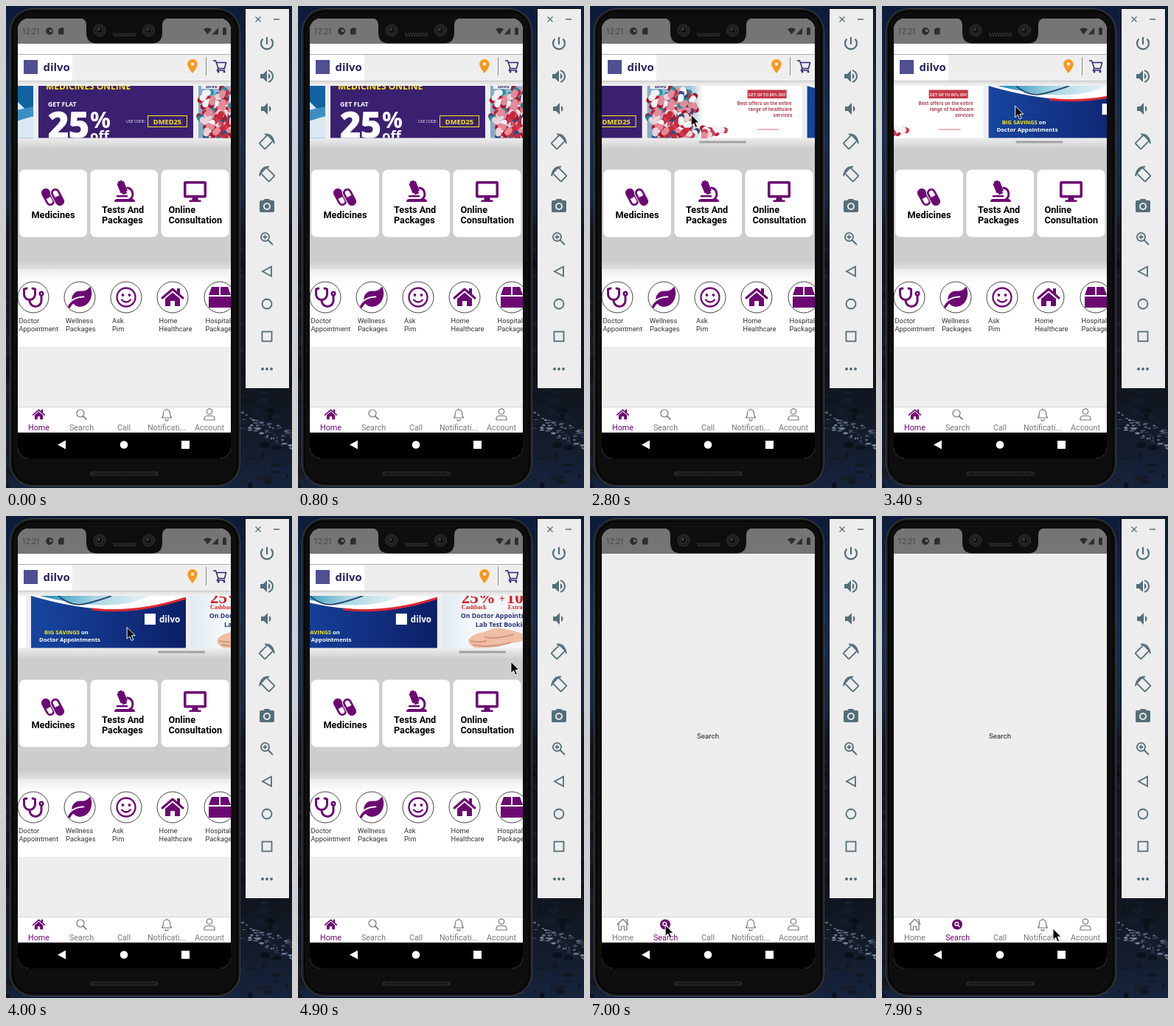
Animation of 388x652 px, one loop 8 s. Source, as an HTML page:

```html
<!DOCTYPE html>
<html lang="en">
<head>
<meta charset="utf-8">
<title>Health app in an emulator</title>
<style>
html, body { margin: 0; width: 100%; height: 100%; overflow: hidden; background: #0d1c38; }
svg { display: block; width: 388px; height: 652px; font-family: Roboto, sans-serif; }
.card { font-weight: 700; font-size: 12.7px; }
.small { font-size: 9.3px; fill: #333; }
.tab { font-size: 10.8px; fill: #777; text-anchor: middle; }
.bold { font-family: "Open Sans", sans-serif; font-weight: 700; }
.serif { font-family: "Liberation Serif", serif; font-weight: 700; fill: #d81f26; }
.mid { text-anchor: middle; }
.line { fill: none; stroke: #777; stroke-width: 1.2; stroke-linejoin: round; stroke-linecap: round; }
.ink { fill: #6c0872; }
.inkline { fill: none; stroke: #6c0872; stroke-width: 3; stroke-linecap: round; stroke-linejoin: round; }
.tool { fill: #546e7a; fill-rule: evenodd; }
.toolline { fill: none; stroke: #546e7a; stroke-width: 1.8; }
</style>
</head>
<body>
<svg viewBox="0 0 388 652">
<defs>
  <linearGradient id="sea" x2="0" y2="1">
    <stop offset="0" stop-color="#0c1b38"/><stop offset=".25" stop-color="#152d56"/>
    <stop offset=".4" stop-color="#152742"/><stop offset=".47" stop-color="#10151f"/>
    <stop offset=".8" stop-color="#10151f"/><stop offset=".9" stop-color="#141c2c"/><stop offset="1" stop-color="#15233d"/>
  </linearGradient>
  <linearGradient id="fade" x2="0" y2="1">
    <stop offset="0" stop-color="#ececec"/><stop offset="1" stop-color="#cdcdcd"/>
  </linearGradient>
  <linearGradient id="shade" x2="0" y2="1">
    <stop offset="0" stop-color="#c9c9c9"/><stop offset="1" stop-color="#e0e0e0"/>
  </linearGradient>
  <linearGradient id="rowtop" x2="0" y2="1">
    <stop offset="0" stop-color="#ececec"/><stop offset="1" stop-color="#fff"/>
  </linearGradient>
  <linearGradient id="photo">
    <stop offset="0" stop-color="#86a9c6"/><stop offset=".28" stop-color="#a9c3d8"/><stop offset=".36" stop-color="#fff"/>
  </linearGradient>
  <linearGradient id="teal">
    <stop offset="0" stop-color="#1485b4"/><stop offset=".5" stop-color="#a9d6e4"/><stop offset="1" stop-color="#e9f3f6"/>
  </linearGradient>
  <linearGradient id="navy">
    <stop offset="0" stop-color="#1746a0"/><stop offset="1" stop-color="#0d1f68"/>
  </linearGradient>
  <linearGradient id="clinic">
    <stop offset="0" stop-color="#dfe9f1"/><stop offset=".2" stop-color="#f6f9fb"/>
    <stop offset=".55" stop-color="#f2f4f8"/><stop offset="1" stop-color="#dfe2ec"/>
  </linearGradient>
  <clipPath id="screen"><rect x="16" y="17" width="289" height="595" rx="15"/></clipPath>
  <clipPath id="strip"><rect x="16" y="108" width="289" height="70.5"/></clipPath>
  <g id="house">
    <path class="inkline" d="M-14 1L0-11 14 1"/>
    <path class="ink" d="M-10 2L0-6.500 10 2V12H3V5H-3V12H-10zM6-12H10V-3L6-6z"/>
  </g>
</defs>

<rect width="388" height="652" fill="url(#sea)"/>
<g id="rocks"></g>

<!-- phone body -->
<rect x="317" y="146" width="2.500" height="31" fill="#222"/>
<rect x="317" y="194" width="2.500" height="62" fill="#222"/>
<rect x="5.500" y="3.500" width="312" height="646" rx="31" fill="#1a1a1a" stroke="#444"/>
<rect x="9" y="7" width="305" height="639" rx="27" fill="#0e0e0e" stroke="#050505" stroke-width="2"/>
<rect x="114" y="629.500" width="93" height="6" rx="3" fill="#262626"/>
<path d="M119 632.500H203" stroke="#0c0c0c" stroke-width="3" stroke-dasharray="1.500 1.500"/>

<g clip-path="url(#screen)">
  <rect x="16" y="15" width="289" height="597" fill="#eee"/>

  <g id="home">
    <rect x="16" y="51" width="289" height="15" fill="#fff"/>
    <rect x="16" y="66" width="74" height="35" fill="#fff"/>
    <path d="M16 65.500H305" stroke="#aaa"/>
    <path d="M16 101.500H305" stroke="#c4c4c4"/>
    <rect x="16" y="102" width="289" height="3" fill="#e2e2e2"/>
    <rect x="24" y="73" width="19" height="19" fill="#504f91"/>
    <text class="bold" x="50.500" y="87.500" font-size="14.900" fill="#26225f">dilvo</text>
    <path transform="translate(241.500 70) scale(.95)" fill="#f9981d" fill-rule="evenodd" d="M12 2C8.100 2 5 5.100 5 9c0 5.300 7 13 7 13s7-7.700 7-13c0-3.900-3.100-7-7-7zm0 9.500a2.500 2.500 0 1 1 0-5 2.500 2.500 0 0 1 0 5z"/>
    <path d="M271.500 69V94" stroke="#8d8d8d"/>
    <path d="M281 74H284.500L288 84.500H296.500L298.500 76.500H286M288 84.500L286.500 87H297" fill="none" stroke="#302270" stroke-width="1.500"/>
    <circle cx="288" cy="89" r="1.400" fill="#302270"/><circle cx="296" cy="89" r="1.400" fill="#302270"/>

    <g clip-path="url(#strip)"><g id="slides">
      <rect x="-173" y="108" width="210" height="71" fill="#1262a0"/>
      <path d="M-173 179V150L10 124 37 150V179z" fill="#d9e8f2"/>
      <path d="M-20 148L37 136V149L0 160z" fill="#3b8fc0"/>

      <rect x="44" y="108" width="210" height="71" fill="#3b2070"/>
      <g class="bold" fill="#fff">
        <text x="54" y="112.500" font-size="12" fill="#f8e71c">MEDICINES ONLINE</text>
        <text x="57" y="136" font-size="8.700">GET FLAT</text>
        <text x="56.500" y="178.500" font-size="50" font-weight="800" letter-spacing="-1.500">25</text>
        <text x="114" y="164.500" font-size="31">%</text>
        <text x="114" y="181.500" font-size="18.500">off</text>
        <text x="163" y="158" font-size="5.200" font-weight="400">USE CODE:</text>
        <rect x="192.500" y="148.500" width="53" height="15" fill="none" stroke="#f8e71c"/>
        <text x="219" y="159.500" font-size="9.300" fill="#f8e71c" class="mid">DMED25</text>
      </g>

      <rect x="261" y="108" width="210" height="71" fill="url(#photo)"/>
      <g id="pills" stroke-width="8" stroke-linecap="round"></g>
      <rect x="265" y="108" width="24" height="4" fill="#eef3f7"/>
      <text class="bold" x="271" y="110.500" font-size="6.500" fill="#26225f">dilvo</text>
      <rect x="397" y="113.500" width="53" height="11.500" fill="#c63a4a"/>
      <g class="mid" font-weight="500">
        <text x="423.500" y="121.500" font-size="5.600" fill="#fff">GET UP TO 80% OFF</text>
        <g font-size="6.500" letter-spacing=".15" fill="#a3283c">
          <text x="420" y="134">Best offers on the entire</text>
          <text x="428" y="142">range of healthcare</text>
          <text x="445" y="150">services</text>
        </g>
      </g>
      <path d="M410 167H440" stroke="#c63a4a" stroke-width=".7"/>

      <rect x="478" y="108" width="210" height="71" fill="url(#navy)"/>
      <path d="M478 108H688V111Q600 144 478 108z" fill="#fff"/>
      <path d="M490 108H638Q590 133 490 108z" fill="url(#teal)"/>
      <path d="M560 126Q620 133 688 111" fill="none" stroke="#dc2a32" stroke-width="3"/>
      <path d="M515 108q18 16 40 10t32-10" fill="none" stroke="#274c74" stroke-width="2"/>
      <text class="bold" x="496" y="160" font-size="7.700" fill="#f8e71c">BIG SAVINGS <tspan fill="#fff">on</tspan></text>
      <text class="bold" x="489" y="170" font-size="7.700" fill="#fff">Doctor Appointments</text>
      <text class="bold" x="494" y="184.500" font-size="8" fill="#fff">&amp; Health Checkups</text>
      <rect x="632" y="132" width="15" height="15" fill="#fff"/>
      <text class="bold" x="652" y="143.500" font-size="11.600" fill="#fff">dilvo</text>

      <rect x="695" y="108" width="210" height="71" fill="url(#clinic)"/>
      <path d="M731 166Q739 158 752 157Q766 149 780 153Q800 156 811 163Q806 171 786 172Q770 179 741 179Q728 174 731 166z" fill="#efbfa6"/>
      <path d="M736 174q24 5 52-3M752 164q18 3 40-4M733 169q10 3 22 0" fill="none" stroke="#d3967c" stroke-width="2"/>
      <g class="serif">
        <text x="721" y="117.500" font-size="23">25%</text>
        <text x="772" y="116" font-size="14">+</text>
        <text x="782" y="117.500" font-size="23">10%</text>
        <text x="721" y="126" font-size="8">Cashback</text>
        <text x="784" y="126" font-size="8">Extra DilCash</text>
      </g>
      <g class="bold mid" font-size="8.800" fill="#28307c">
        <text x="777" y="138">On Doctor Appointment &amp;</text>
        <text x="777" y="149.500">Lab Test Booking</text>
      </g>
      <text x="828" y="177" font-size="7.600" fill="#d81f26">Also,Get Upto</text>
    </g></g>

    <rect x="16" y="179" width="289" height="15" fill="url(#fade)"/>
    <rect id="bar" y="182.500" width="64" height="3" rx="1" fill="#a3a3a3"/>
    <rect x="16" y="193" width="289" height="149" fill="#cdcdcd"/>
    <rect x="16" y="342" width="289" height="14" fill="url(#shade)"/>
    <g fill="#fff">
      <rect x="18" y="221.500" width="92" height="91" rx="7"/>
      <rect x="114.500" y="221.500" width="91.500" height="91" rx="7"/>
      <rect x="210.500" y="221.500" width="92" height="91" rx="7"/>
    </g>
    <g class="card">
      <text x="34.500" y="287">Medicines</text>
      <text x="130" y="280">Tests And</text><text x="130" y="294">Packages</text>
      <text x="220.500" y="280">Online</text><text x="220.500" y="294">Consultation</text>
    </g>
    <g id="capsules"></g>
    <g class="ink">
      <path d="M147 265q0-4 4-4H171q4 0 4 4zM150 258.500H165V256H150z"/>
      <path transform="rotate(-22 158 246)" d="M155 236H161V238H163V252H161V255H155V252H153V238H155z"/>
      <path class="inkline" d="M165 246a8.500 8.500 0 0 1 2 16"/>
      <path fill-rule="evenodd" d="M243.500 237H269.500q2.500 0 2.500 2.500V257q0 2.500-2.500 2.500H260L261 262.500H264.500V265H248.500V262.500H252L253 259.500H243.500q-2.500 0-2.500-2.500V239.500q0-2.500 2.500-2.500zM244.500 240.500V256H268.500V240.500z"/>
    </g>

    <rect x="16" y="356" width="289" height="105" fill="#fff"/>
    <rect x="16" y="356" width="289" height="18" fill="url(#rowtop)"/>
    <g fill="#fff" stroke="#333" stroke-width=".9">
      <circle cx="37" cy="394" r="21"/><circle cx="100" cy="394" r="21"/><circle cx="163" cy="394" r="21"/>
      <circle cx="226" cy="394" r="21"/><circle cx="290" cy="394" r="21"/>
    </g>
    <path class="inkline" d="M28 382L24.500 383V390a7.500 7.500 0 0 0 15 0V383L36 382M32 398.500a8 8 0 0 0 16 0V390"/>
    <circle cx="48" cy="389" r="3.500" class="ink"/><circle cx="48" cy="389" r="1" fill="#fff"/>
    <path class="ink" transform="translate(84 380) scale(.056)" d="M546 10c-6-13-22-13-28-1C487 62 431 96 368 96h-80C182 96 96 182 96 288l2 20C161 263 253 224 384 224c9 0 16 7 16 16s-7 16-16 16C133 256 26 410 2 468c-7 16 1 35 18 42s35-1 42-18c1-4 21-48 72-90 32 44 94 85 175 77C466 468 576 327 576 154c0-50-11-102-30-144z"/>
    <g class="inkline" style="stroke-width:2.300">
      <circle cx="163" cy="394" r="12.500"/><path d="M157 397.500q6 6 12 0"/>
    </g>
    <circle cx="158.500" cy="391" r="1.900" class="ink"/><circle cx="167.500" cy="391" r="1.900" class="ink"/>
    <use href="#house" x="226" y="394"/>
    <path class="ink" d="M279 380H289V391H275zM291 380H301L305 391H291zM275 393H305V408H275z"/>
    <g class="small">
      <text x="17.500" y="429">Doctor</text><text x="17.500" y="439.500">Appointment</text>
      <text x="81" y="429">Wellness</text><text x="81" y="439.500">Packages</text>
      <text x="144" y="429">Ask</text><text x="144" y="439.500">Pim</text>
      <text x="207.500" y="429">Home</text><text x="207.500" y="439.500">Healthcare</text>
      <text x="270.500" y="429">Hospital</text><text x="270.500" y="439.500">Packages</text>
    </g>
  </g>

  <text id="search" class="mid" x="160" y="300.500" font-size="9.800" fill="#222">Search</text>

  <!-- status bar -->
  <rect x="16" y="15" width="289" height="36" fill="#757575"/>
  <text x="21.500" y="38" font-size="10" fill="#444">12:21</text>
  <g fill="#2e2e2e">
    <path fill-rule="evenodd" d="M59 29a5 5 0 1 0 .01 0zM59 31.500V35H62.500A3.500 3.500 0 0 0 59 31.500z"/>
    <path d="M73.500 29.500H78.500V38.500H71V32z"/>
    <path d="M268 31.500q5.500-4 11 0L273.500 38.500zM288 29.500V38.500H279.500zM294 30H295.200V29H297.800V30H299V39H294z"/>
  </g>

  <!-- tab bar -->
  <rect x="16" y="542" width="289" height="35" fill="#fff"/>
  <path d="M16 542.500H305" stroke="#d5d5d5"/>
  <g id="homeOn">
    <use href="#house" transform="translate(44.500 552.500) scale(.56)"/>
    <g class="line"><circle cx="101" cy="551" r="5"/><path d="M104.800 554.800L109 559" stroke-width="1.700"/></g>
  </g>
  <g id="searchOn">
    <path class="line" d="M37 552.500L44.500 545.500 52 552.500M39 551V560H42.500V555H46.500V560H50V551M48.500 546H50.500V550"/>
    <circle cx="102" cy="552.500" r="7" class="ink"/>
    <circle cx="101.300" cy="551.700" r="2.400" fill="none" stroke="#fff" stroke-width="1.300"/>
    <path d="M103 553.500L105.500 556" stroke="#fff" stroke-width="1.500"/>
  </g>
  <g class="line">
    <path d="M211.500 557H224.500Q222.500 555 222.500 550.500A4.500 4.500 0 0 0 213.500 550.500Q213.500 555 211.500 557zM216 559a2 2 0 0 0 4 0M218 544.800V546"/>
    <circle cx="276" cy="548.500" r="3.700"/><path d="M269 560V558.500Q269 554.500 273 554.500H279Q283 554.500 283 558.500V560z"/>
  </g>
  <g class="tab">
    <text id="tabHome" x="44.500" y="574">Home</text><text id="tabSearch" x="102.500" y="574">Search</text>
    <text x="160" y="574">Call</text><text x="218" y="574">Notificati...</text><text x="276" y="574">Account</text>
  </g>
  <rect x="16" y="577" width="289" height="36"/>
  <path d="M70 593.500L81 587.500V599.500zM238 588H249V599H238z" fill="#fff"/>
  <circle cx="160" cy="593.500" r="5.300" fill="#fff"/>
</g>

<!-- notch -->
<path d="M101 16Q109 18 109 26V36Q109 50.500 123 50.500H198Q212 50.500 212 36V26Q212 18 220 16z" fill="#0e0e0e"/>
<g fill="#1c1f1e" stroke="#333">
  <circle cx="127" cy="33" r="8"/><circle cx="193.500" cy="33" r="8"/>
  <circle cx="127" cy="33" r="4" fill="#0b0f0d"/><circle cx="193.500" cy="33" r="4" fill="#0b0f0d"/>
</g>
<circle cx="126" cy="32" r="1.200" fill="#596056"/><circle cx="192.500" cy="32" r="1.200" fill="#596056"/>
<path d="M145 37.500H177M146.500 40H176" stroke="#3a3a3a" stroke-width="1.800" stroke-dasharray="2 1.500"/>

<!-- emulator toolbar -->
<rect x="324.500" y="3.500" width="60" height="514" fill="#ededed" stroke="#0c0c0c"/>
<path class="toolline" d="M338.500 14.500L345.500 21.500M345.500 14.500L338.500 21.500M363 18H371" style="stroke-width:1.300"/>
<path class="toolline" d="M354 42V52M348.500 44.500a8 8 0 1 0 11 0" style="stroke-width:2.200"/>
<g class="tool">
  <path transform="translate(342 83)" d="M3 9v6h4l5 5V4L7 9H3zm13.500 3c0-1.800-1-3.300-2.500-4v8c1.500-.7 2.500-2.200 2.500-4zM14 3.200v2.100c2.900.9 5 3.500 5 6.700s-2.100 5.800-5 6.700v2.100c4-.9 7-4.500 7-8.800s-3-7.900-7-8.800z"/>
  <path transform="translate(341 127)" d="M18.500 12c0-1.800-1-3.300-2.500-4v8c1.500-.7 2.500-2.200 2.500-4zM5 9v6h4l5 5V4L9 9H5z"/>
  <path transform="translate(342 259)" d="M9 2L7.200 4H4Q2 4 2 6V18q0 2 2 2H20q2 0 2-2V6q0-2-2-2H16.800L15 2zM12 7a5 5 0 1 1-.01 0zM12 8.800a3.200 3.200 0 1 0 .01 0z"/>
  <circle cx="348" cy="491" r="2"/><circle cx="354" cy="491" r="2"/><circle cx="360" cy="491" r="2"/>
</g>
<g class="toolline">
  <g id="turn" transform="translate(354 183)">
    <rect x="-8" y="-5.500" width="16" height="11" rx="1" transform="translate(-1 1) rotate(-45)"/>
    <path d="M-3-9.500Q8-10 10 3"/>
  </g>
  <use href="#turn" transform="translate(708 44) scale(-1 1)"/>
  <circle cx="351.500" cy="312.500" r="5.600"/><path d="M355.500 316.500L362 323M348.500 312.500H354.500M351.500 309.500V315.500"/>
  <path d="M360 352.500V365.500L348 359z"/><circle cx="354" cy="403" r="6.500"/><rect x="347.500" y="440.500" width="13" height="13"/>
</g>

<path id="cursor" d="M0 0V15.500L3.600 12.200 6 17.800 8.600 16.700 6.200 11.200H11z" fill="#000" stroke="#fff"/>
</svg>
<script>
const $ = id => document.getElementById(id);
let seed = 7;
const rnd = (a = 0, b = 1) => a + (b - a) * ((seed = seed * 16807 % 2147483647) / 2147483647);
const pick = list => list[Math.floor(rnd(0, list.length))];
const show = (id, on) => $(id).style.display = on ? "" : "none";

// rocky shore with a belt of foam behind the phone
const speck = (x, y, rx, ry, tones) =>
  `<ellipse cx="${x}" cy="${y}" rx="${rnd(1, rx)}" ry="${rnd(.5, ry)}" fill="${pick(tones)}"/>`;
let rocks = "";
for (let i = 0; i < 150; i++)
  rocks += speck(pick([rnd(0, 5), rnd(318, 388), rnd(318, 388)]), rnd(300, 652), 9, 5, ["#0c1018", "#121720", "#181d27", "#141b2b"]);
for (let i = 0; i < 70; i++) {
  const x = rnd(320, 388);
  rocks += speck(x, 558 + (x - 320) * .4 + rnd(-10, 14), 4, 1.6, ["#3f4d63", "#5c6b80", "#77859a", "#26324a"]);
}
$("rocks").innerHTML = rocks;

// loose pills in the photo banner
const pill = (x, y) => {
  const a = rnd(0, 6.3), dx = 4 * Math.cos(a), dy = 4 * Math.sin(a);
  const half = (k, c) => `<path d="M${x} ${y}l${k * dx} ${k * dy}" stroke="${c}"/>`;
  return half(1, pick(["#c01f3a", "#d23a52", "#a8182f", "#1f8f9c", "#27507f"])) + half(-1, pick(["#f2f2f2", "#c8283c", "#e9d3d6", "#e58a9a"]));
};
let pills = "";
for (let i = 0; i < 85; i++) pills += pill(rnd(266, 328), rnd(112, 180));
for (let i = 0; i < 7; i++) pills += pill(rnd(334, 372), rnd(167, 182));
$("pills").innerHTML = pills;

$("capsules").innerHTML = [57, 70].map(x => `<g transform="translate(${x} 258.500) rotate(-28)">
  <rect x="-6.500" y="-13" width="13" height="26" rx="6.500" class="ink" stroke="#fff"/>
  <path d="M-3.200 ${x < 60 ? "1V6.500a3.200 3.200 0 0 0 6.400 0V1" : "-1V-6.500a3.200 3.200 0 0 1 6.400 0V-1"}z" fill="#fff"/></g>`).join("");

const scroll = [[2000, 0], [2200, 22], [2500, 112], [2700, 172], [3100, 217], [3200, 245], [3400, 333], [3600, 404],
  [4000, 444], [4600, 455], [4900, 499], [5600, 601]];
const mouse = [[1600, 262, 190], [1900, 199, 146], [2000, 199, 146], [2200, 177, 146], [2500, 87, 148], [2700, 95, 150],
  [3100, 262, 137], [3200, 262, 136], [3400, 181, 135], [3600, 110, 138], [3900, 130, 145], [4500, 333, 178],
  [4900, 289, 197], [5600, 187, 260], [6000, 78, 556], [6300, 99, 553], [7000, 102, 553], [7900, 232, 558]];
const fade = [[2000, 0], [2100, 1], [6000, 1], [6300, 0]];

function at(keys, t) {
  const i = keys.findIndex(k => k[0] > t);
  if (i <= 0) return keys[i ? keys.length - 1 : 0].slice(1);
  const a = keys[i - 1], b = keys[i], p = (t - a[0]) / (b[0] - a[0]);
  return a.slice(1).map((v, j) => v + (b[j + 1] - v) * p);
}

function draw(now) {
  const t = now % 8000, searching = t >= 6600;
  const [s] = at(scroll, t), [x, y] = at(mouse, t);
  $("slides").setAttribute("transform", `translate(${-s} 0)`);
  $("bar").setAttribute("x", 107 + s * .223);
  $("bar").setAttribute("opacity", at(fade, t)[0]);
  $("cursor").setAttribute("transform", `translate(${x} ${y})`);
  show("cursor", t >= 1600);
  for (const id of ["home", "homeOn"]) show(id, !searching);
  for (const id of ["search", "searchOn"]) show(id, searching);
  $("tabHome").style.fill = searching ? "" : "#6c0872";
  $("tabSearch").style.fill = searching ? "#6c0872" : "";
  requestAnimationFrame(draw);
}
draw(0);
</script>
</body>
</html>
```
